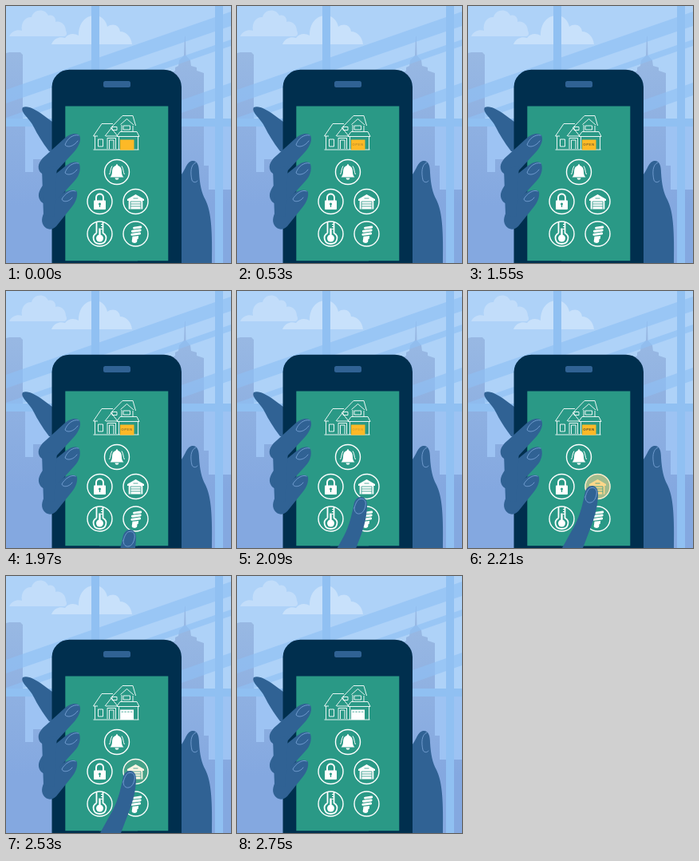
These frames come from a looping animation (282 by 322 pixels, 3.06 s). An HTML page:

```html
<!DOCTYPE html>
<html lang="en">
<head>
<meta charset="utf-8">
<title>Smart home phone</title>
<style>
  html, body { margin: 0; height: 100%; overflow: hidden; background: #aed2f8; }
  svg { display: block; width: 100vw; height: 100vh; }
  .skin { fill: #306294; }
  .nail { fill: none; stroke: #7fa9dc; stroke-width: .8; stroke-linecap: round; }
  .line { fill: none; stroke: #fff; stroke-width: 1; stroke-linejoin: round; }
  .ring { fill: none; stroke: #fff; stroke-width: 1.4; }
  .cut { fill: none; stroke: #2a9986; stroke-width: .8; }
  .white { fill: #fff; }
  text { font: bold 4.4px Arial, "Liberation Sans", sans-serif; letter-spacing: .5px; fill: #1d2733; text-anchor: middle; }
</style>
</head>
<body>
<svg viewBox="0 0 282 322" preserveAspectRatio="none">
  <defs>
    <linearGradient id="haze" gradientUnits="userSpaceOnUse" x1="0" y1="60" x2="0" y2="250">
      <stop stop-color="#98b8e3"/>
      <stop offset="1" stop-color="#84a8e0"/>
    </linearGradient>
  </defs>

  <!-- sky and city -->
  <rect width="282" height="322" fill="#aed2f8"/>
  <path fill="#fff" opacity=".24" d="M4 38C7 31 15 29 20 31C18 20 25 13 32 14C34 4 49 2 53 12C59 10 63 15 62 20C69 18 75 24 75 31C77 34 76 38 73 38Z"/>
  <path fill="#fff" opacity=".32" d="M57 48C60 40 68 38 74 40C78 34 86 34 91 37C91 22 99 12 111 12C121 12 126 20 127 26C134 21 142 24 143 32C151 32 157 39 158 48Z"/>
  <path fill="#9dc3f3" d="M0 146H282V322H0Z"/>
  <path fill="url(#haze)" d="M0 59L4 58H18L21 61V150H24V208H34V192H48V218H60V322H0ZM207 322V84L212 81V77L216 75L217 68L223 62L224 38H224.800L225.500 62L231 68L232 75L239 77V81L248 84V200H254V230H282V322Z"/>
  <path fill="#8fc0f5" opacity=".65" d="M0 105L282 7V25L0 122ZM0 140L282 42V50L0 148ZM200 125L282 96V112L200 141Z"/>
  <path fill="#90c0f2" d="M107 0H117V90H107ZM262 0H272V322H262ZM0 141H60V151H0ZM218 141H282V151H218Z"/>

  <!-- hand behind the phone -->
  <path class="skin" d="M21 127C27 124 37 130 43 134L62 148V182H54C45 170 39 160 35 152C31 142 17 133 21 127Z"/>
  <path class="skin" d="M216 215C225 208 225 196 233 194C240 193 242 200 242 209C243 224 245 234 250 243C256 256 259 272 258 322H216Z"/>
  <path class="nail" d="M238 196C231 199 231 209 233 218C234 221 238 222 240 219"/>

  <!-- phone -->
  <rect x="57.500" y="79.700" width="162.500" height="270" rx="22" fill="#002f4e"/>
  <rect x="122" y="94" width="34" height="8" rx="2.500" fill="#306294"/>
  <rect x="74.300" y="125.500" width="129" height="194" fill="#2a9986"/>

  <!-- house -->
  <path class="line" style="stroke-width:.9" d="M109.500 163L120 147.500H134M109.500 163H115M125 163H140M124 163L132 153L140 163M131 153L146 137.500H159L162.500 150M143.500 148.500L151.500 141.500L160 149M139 163L143 157.500H164L167 163.500H139M145 149V157M159 150V157M111.500 163V179.500M141.500 164V180M165.500 164V180M127 179V165.500H137.500V179M115.500 167H121.500V176H115.500ZM129.500 179V168H135V179M147 150H155.500V155H147ZM133 151.500H139V155.500H133ZM109.500 180H166.500"/>
  <rect id="openDoor" x="143" y="167.500" width="17.500" height="13" fill="#fdb927"/>
  <text id="label" x="151.500" y="174.900">OPEN</text>
  <g id="closedDoor">
    <rect class="white" x="143" y="167.500" width="17" height="12.500"/>
    <path class="cut" d="M144.500 170.200H158.500" stroke-dasharray="2.600 1.200"/>
  </g>

  <!-- buttons -->
  <g id="rings"></g>
  <g transform="translate(139 208)">
    <path class="white" d="M-8.500 6.500C-5 3 -6.500 -1 -5.500 -4C-4.500 -7 -2 -8 -1.300 -8C-1.300 -10.500 1.300 -10.500 1.300 -8C2 -8 4.500 -7 5.500 -4C6.500 -1 5 3 8.500 6.500ZM-2.500 7.500H2.500C2 10.500 -2 10.500 -2.500 7.500Z"/>
    <path class="line" d="M-6 -7.500C-8.500 -4 -7.500 0 -9.500 3M6 -7.500C8.500 -4 7.500 0 9.500 3"/>
  </g>
  <g transform="translate(117.500 245)">
    <rect class="white" x="-7.500" y="-1.500" width="15" height="11.500" rx="1"/>
    <path class="line" style="stroke-width:2" d="M-4.500 -1V-5C-4.500 -11 4.500 -11 4.500 -5V-1"/>
    <circle cy="3" r="1.500" fill="#2a9986"/>
    <path class="cut" style="stroke-width:1.300" d="M0 3V7"/>
  </g>
  <g fill="#fff">
    <g id="garage" transform="translate(162.500 245)">
      <path d="M-10.500 -3L0 -9L10.500 -3V-1H8.800V9.500H-8.800V-1H-10.500Z"/>
      <path class="cut" d="M-6.500 9.500V0H6.500V9.500M-6.500 3H6.500M-6.500 6H6.500M-3 -4H3"/>
    </g>
  </g>
  <g transform="translate(117.500 285.500)">
    <path class="line" style="stroke-width:1.800" d="M-4 -1V-15M4 -15V-1C11 3 8 12.500 0 12.500C-8 12.500 -11 3 -4 -1"/>
    <circle class="white" cy="5.500" r="4.500"/>
    <path class="line" style="stroke-width:2.400" d="M0 5V-7"/>
    <path class="line" d="M1.500 -12H4M1.500 -9H4M1.500 -6H4"/>
  </g>
  <g transform="translate(162.500 285.500) rotate(8)">
    <path class="line" style="stroke-width:2.900;stroke-linecap:round" d="M-3 -7L5 -9.300M-4.500 -2.700L5 -5.300M-4.500 1.500L5 -1.200"/>
    <path class="white" d="M-3.500 3.800L4 2V6H3V10L1 11.500H-2L-3.500 10Z"/>
  </g>
  <g id="flash" fill="#fdc85a">
    <circle cx="162.500" cy="245" r="16" fill="#fdd893" opacity=".8"/>
    <use href="#garage"/>
  </g>

  <!-- pressing finger -->
  <g id="finger">
    <path class="skin" d="M108 342L118 322L134 293C141 280 144 265 146.500 253C149 241 163 241 163 254C163 266 160 280 155 293L144 322L136 342Z"/>
    <path class="nail" d="M147 258C149 251 151 247 155 246.500C160 246 162 250 161 255C160 260 158 264 154 265C150 266 147 263 147 258"/>
  </g>
  <path fill="#002f4e" d="M74 319.600H117V322H74ZM165 319.600H204V322H165Z"/>

  <!-- fingers around the phone -->
  <path class="skin" d="M42 207C38 199 44 192 50 187L72 167C79 160 88 158 92 162C95 168 91 176 86 182L62 208C54 213 46 213 42 207Z"/>
  <path class="skin" d="M43 244C38 236 43 229 48 222L74 201C81 195 89 193 92 198C94 204 92 213 86 219L64 243C56 249 47 250 43 244Z"/>
  <path class="skin" d="M47 275C43 268 46 262 50 254L68 238C74 231 85 228 89 233C90 239 87 246 83 251L63 276C58 281 51 281 47 275Z"/>
  <path class="skin" d="M45 204L64 200L60 264L47 262Z"/>
  <path class="nail" d="M91 162C84 160 76 167 74 174C77 178 85 176 90 169M91 197C84 195 76 202 74 209C77 213 85 211 89 205M87 232C82 229 73 236 70 242C71 246 79 246 83 240"/>
</svg>
<script>
  const LOOP = 3060, BLINK_START = 80, HALF_BLINK = 198, CLOSE_AT = 2360;
  const $ = id => document.getElementById(id);
  const ramp = (t, a, b) => Math.min(1, Math.max(0, (t - a) / (b - a)));
  const smooth = u => u * u * (3 - 2 * u);

  $('rings').innerHTML = [[139, 208], [117.5, 245], [162.5, 245], [117.5, 285.5], [162.5, 285.5]]
    .map(([x, y]) => `<circle class="ring" cx="${x}" cy="${y}" r="15.5"/>`).join('');

  function labelOpacity(t) {
    const phase = Math.max(0, t - BLINK_START) / HALF_BLINK % 2;
    return 1 - Math.abs(1 - phase);
  }

  function draw(now) {
    const t = now % LOOP, closed = t >= CLOSE_AT;
    $('label').setAttribute('opacity', closed ? 0 : labelOpacity(t));
    $('openDoor').setAttribute('opacity', closed ? 0 : 1);
    $('closedDoor').setAttribute('opacity', closed ? 1 : 0);
    $('flash').setAttribute('opacity', ramp(t, 2140, 2240) * (1 - ramp(t, 2380, 2560)));
    const raised = smooth(ramp(t, 1840, 2180)) - smooth(ramp(t, 2535, 2745));
    $('finger').setAttribute('transform', `translate(0 ${82 * (1 - raised)})`);
    requestAnimationFrame(() => draw(performance.now()));
  }
  draw(performance.now());
</script>
</body>
</html>
```
